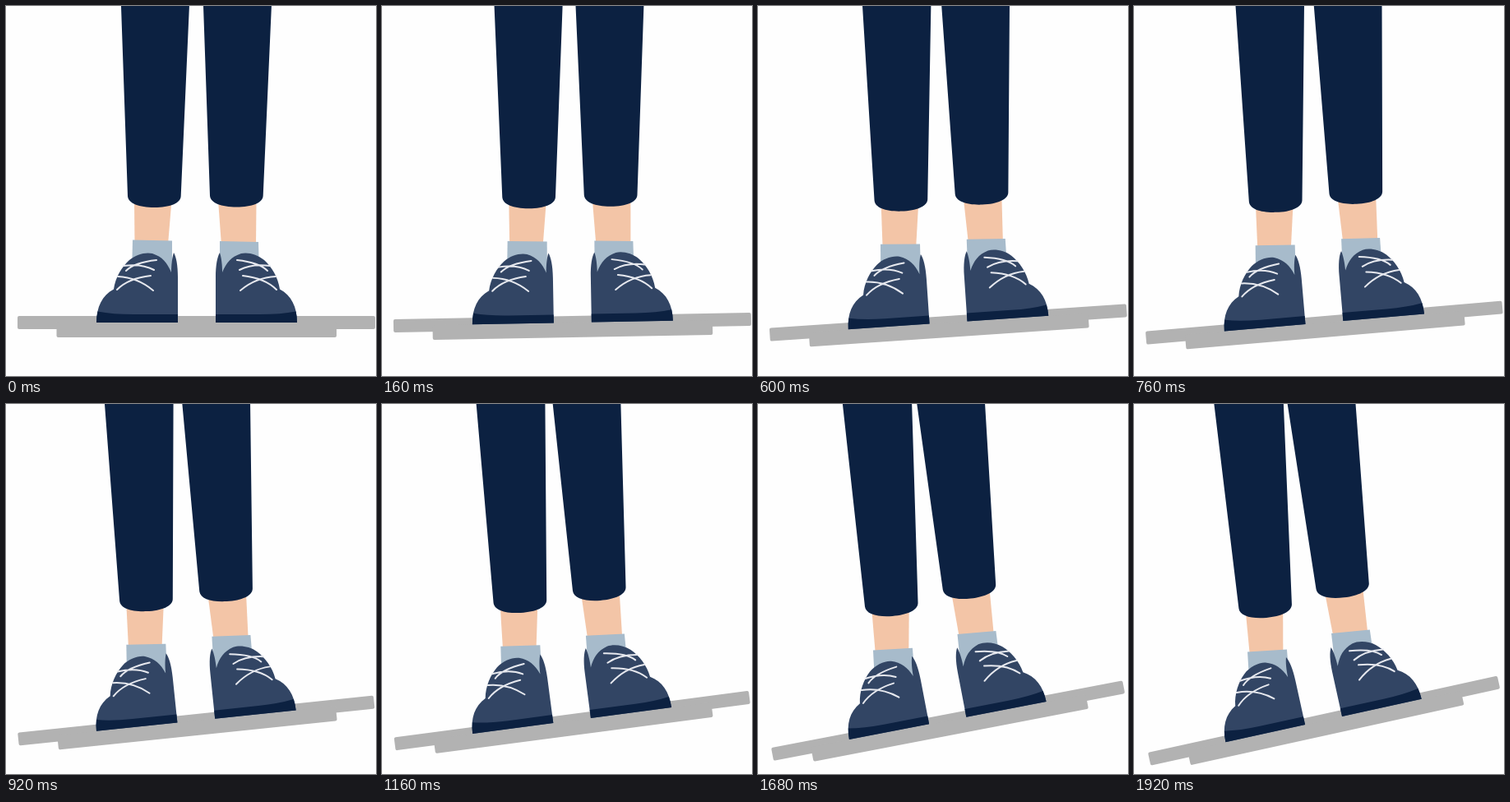
Write an HTML page that moves like this. It is 450 by 450 pixels and loops after 2.88 s.

```html
<!DOCTYPE html>
<html lang="en">
<head>
<meta charset="utf-8">
<title>Tilting ground</title>
<style>
html, body { margin: 0; height: 100%; overflow: hidden; background: #fefefe; }
svg { display: block; width: 100%; height: 100%; }
.ground { fill: #b2b2b2; }
.skin { fill: #f3c5a7; }
.sock { fill: #a7bbcb; }
.pants, .sole { fill: #0c2141; }
.upper { fill: #324564; }
.lace { fill: none; stroke: #e6e8ee; stroke-width: 2; stroke-linecap: round; }
</style>
</head>
<body>
<svg viewBox="0 0 450 450">
  <defs>
    <path id="pants" class="pants" d="M138.6-40H224.7L212.7 231C212.5 240 199 245 180.500 245S148.500 240 148 231Z"/>
    <g id="shoe">
      <path class="upper" d="M110 385C110 366 117 352 131 344.500C133 330 141 317 150 309C158 302 170 299 178 301C190 305 196 312 201 324C201 315 202 306 204 300C207 305 209 315 209 330V385Z"/>
      <path class="sole" d="M110 385Q110 378 111.500 371.500Q130 375 155 375H209V385Z"/>
      <path class="lace" d="M143 316Q165 313 180 321M146 322Q156 312 183 309M136 329Q160 330 179 346M135 345Q149 331 176 328"/>
    </g>
  </defs>
  <g id="ground" class="ground">
    <rect x="14" y="377" width="435" height="16" rx="2"/>
    <rect x="61.500" y="385" width="340.500" height="18" rx="2"/>
  </g>
  <g id="leftLeg">
    <path class="skin" d="M156 236H201.500L197 290H156.500Z"/>
    <path class="sock" d="M154 284.500L202 285.500V328H153Z"/>
    <use href="#pants"/>
  </g>
  <g id="rightLeg">
    <path class="skin" d="M258 236H304.500L304 291H262Z"/>
    <path class="sock" d="M260 286L307 287L308 328H260Z"/>
    <use href="#pants" x="100" y="-.5"/>
  </g>
  <g id="shoes">
    <use href="#shoe"/>
    <use href="#shoe" transform="matrix(-1 0 0 1 464 0)"/>
  </g>
</svg>
<script>
const LOOP = 2880, STEP = 40, STEPS = 48;

// id, final shift, final angle, pivot
const parts = [
  ["ground", 0, 0, -12.4, 232, 387],
  ["shoes", -1, 0, -12.4, 232, 387],
  ["leftLeg", -16, 17, -4.9, 154, 284.5],
  ["rightLeg", -20, -7, -6.8, 260, 286]
];

function draw(now) {
  const p = Math.min(STEPS, Math.floor(now % LOOP / STEP)) / STEPS;
  for (const [id, dx, dy, angle, cx, cy] of parts) {
    document.getElementById(id).setAttribute("transform",
      `translate(${dx * p} ${dy * p}) rotate(${angle * p} ${cx} ${cy})`);
  }
}

const start = performance.now();
function tick() {
  draw(performance.now() - start);
  requestAnimationFrame(tick);
}
tick();
</script>
</body>
</html>
```
